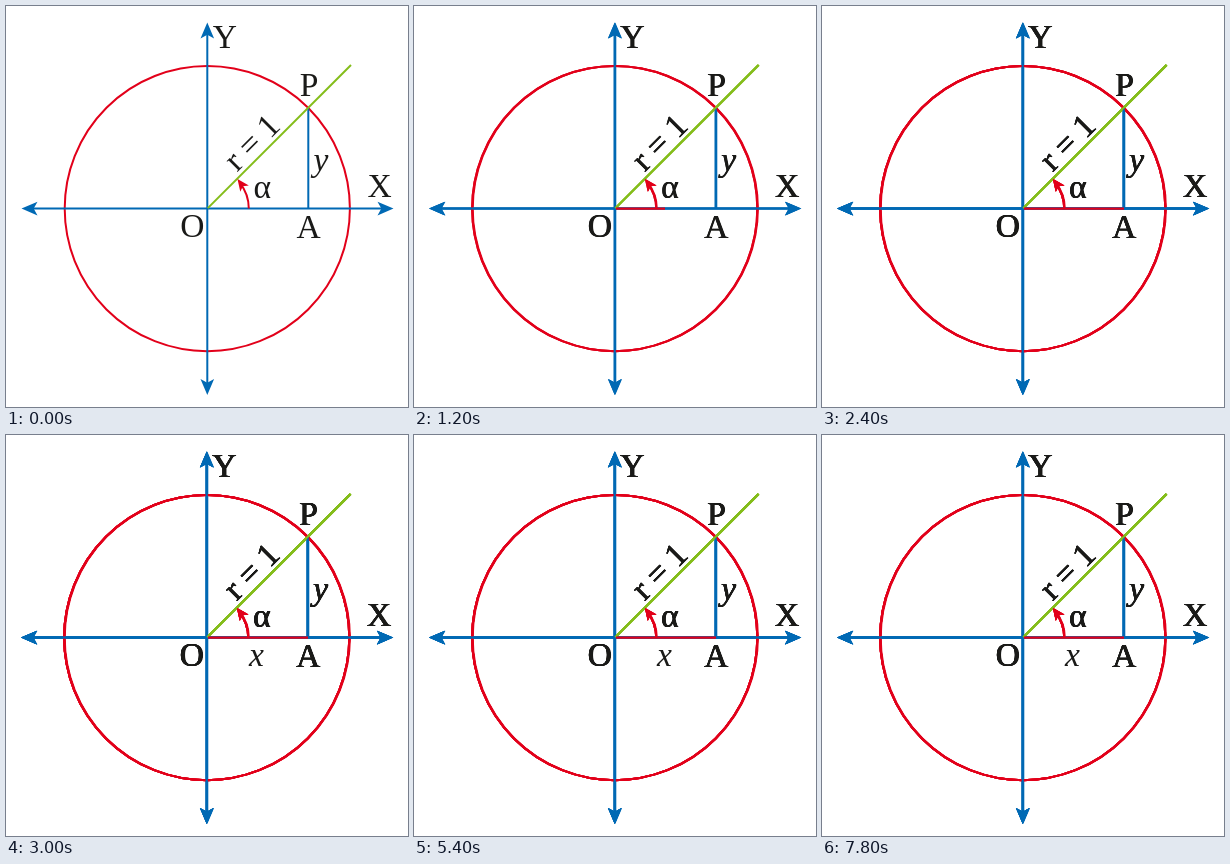
An HTML page with a canvas for the animation above (8.8 s loop, 402x401 px).

```html
<!DOCTYPE html>
<html lang="en">
<head>
<meta charset="utf-8">
<title>Unit circle</title>
<style>
html, body { margin: 0; width: 100%; height: 100%; overflow: hidden; background: #fff; }
canvas { display: block; width: 402px; height: 401px; }
</style>
</head>
<body>
<canvas id="stage" width="402" height="401"></canvas>
<script>
const ctx = document.getElementById('stage').getContext('2d');
const BLUE = '#0069b4', RED = '#e2001a', GREEN = '#84bd1a', INK = '#1a1a18';
const LOOP = 8800, STEP = 600, LAST = 5;
const OX = 201.3, OY = 202.6, R = 142.6;
const SERIF = '"Liberation Serif", "Times New Roman", serif';
const reach = [0, 219, 251, 283, 302, 302]; // right end of the red segment per step

const labels = [
  ['Y', 218.8, 42], ['X', 373.5, 191], ['P', 303, 90],
  ['O', 186.3, 231], ['A', 302.7, 232], ['α', 256.3, 192],
  ['y', 315, 165, 'italic']
];

function line(x1, y1, x2, y2, color, width = 2) {
  ctx.strokeStyle = color;
  ctx.lineWidth = width;
  ctx.beginPath();
  ctx.moveTo(x1, y1);
  ctx.lineTo(x2, y2);
  ctx.stroke();
}

function arc(radius, from, to) {
  ctx.strokeStyle = RED;
  ctx.lineWidth = 2;
  ctx.beginPath();
  ctx.arc(OX, OY, radius, from, to, true);
  ctx.stroke();
}

function head(x, y, angle, color, length, half) {
  ctx.save();
  ctx.translate(x, y);
  ctx.rotate(angle);
  ctx.fillStyle = color;
  ctx.beginPath();
  ctx.moveTo(0, 0);
  ctx.lineTo(-length, -half);
  ctx.lineTo(-length * 0.76, 0);
  ctx.lineTo(-length, half);
  ctx.fill();
  ctx.restore();
}

function text(str, x, y, style = '', align = 'center') {
  ctx.font = `${style} 33.5px ${SERIF}`;
  ctx.textAlign = align;
  ctx.fillStyle = INK;
  ctx.fillText(str, x, y);
}

function figure() {
  arc(R, 2 * Math.PI, 0);
  line(25, OY, 378, OY, BLUE);
  line(OX, 26, OX, 380, BLUE);
  head(387.5, OY, 0, BLUE, 16, 6.8);
  head(15.5, OY, Math.PI, BLUE, 16, 6.8);
  head(OX, 16.5, -Math.PI / 2, BLUE, 16, 6.8);
  head(OX, 389, Math.PI / 2, BLUE, 16, 6.8);
  line(302.3, 102, 302.3, OY, BLUE);
  line(OX + 0.5, OY - 0.5, 345, 59, GREEN);
  arc(41.5, 0, -0.66);
  head(231.5, 173, -2.2, RED, 12, 5.3);
  for (const label of labels) text(...label);
  ctx.save();
  ctx.translate(OX, OY);
  ctx.rotate(-Math.PI / 4);
  text('r = 1', 46.5, -4.5, '', 'left');
  ctx.restore();
}

function draw(step) {
  ctx.fillStyle = '#fff';
  ctx.fillRect(0, 0, 402, 401);
  // Repeated passes deepen the soft edges, so the drawing grows bolder.
  for (let pass = 0; pass <= step; pass++) {
    ctx.save();
    if (pass) ctx.translate(-0.6, 0);
    figure();
    ctx.restore();
  }
  if (step) line(202, OY, reach[step], OY, RED, 2.4);
  if (step === LAST) text('x', 250.5, 231, 'italic');
}

const start = performance.now();
let shown = -1;
function tick() {
  const time = (performance.now() - start) % LOOP;
  const step = Math.min(LAST, Math.floor(time / STEP));
  if (step !== shown) draw(shown = step);
  requestAnimationFrame(tick);
}
tick();
</script>
</body>
</html>
```
